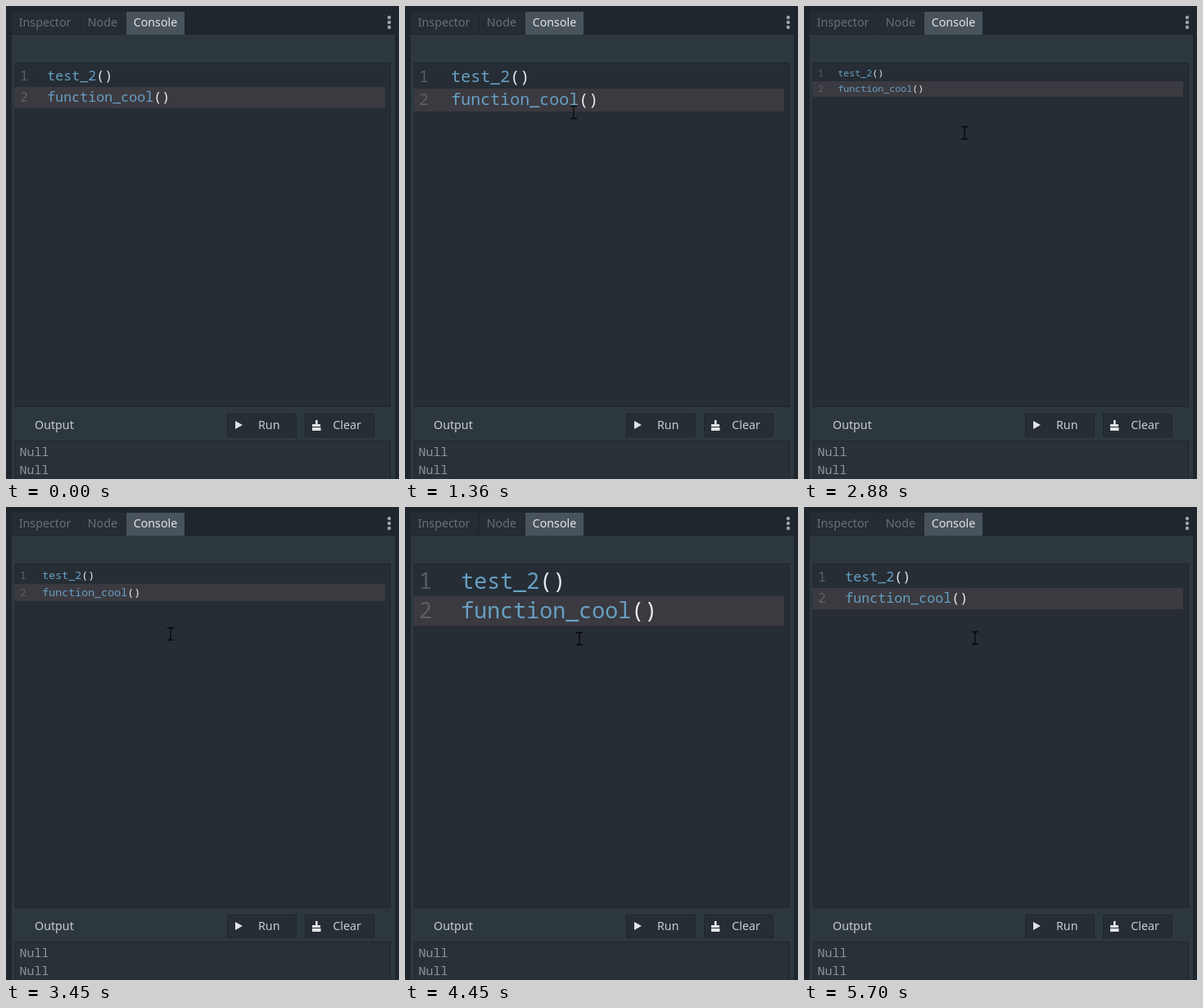
Animation of 480 by 578 pixels, one loop 6000 ms. Source, as an HTML page:

```html
<!DOCTYPE html>
<html lang="en">
<head>
<meta charset="utf-8">
<title>Console zoom</title>
<style>
  html, body { margin: 0; width: 100%; height: 100%; overflow: hidden; background: #20262e; }
  svg { display: block; }
  rect { shape-rendering: crispEdges; }
  text { font: 14.25px "Noto Sans", sans-serif; fill: #c9ced1; white-space: pre; }
  .dim { fill: #697077; }
  .mono { font: 15px "Noto Sans Mono", monospace; fill: #8d9498; }
  .code { font-family: "Noto Sans Mono", monospace; font-size: inherit; fill: #67a0c4; }
  .code tspan { fill: #e6eaec; }
  .num { fill: #596066; }
  .box { fill: #262d34; stroke: #1f262c; }
  .icon { fill: #e0e3e5; }
</style>
</head>
<body>
<svg width="480" height="578" viewBox="0 0 480 578">
  <rect width="480" height="578" fill="#20262e"/>
  <rect x="7" y="35" width="468" height="543" fill="#2d383e"/>
  <rect x="7" y="34" width="468" height="1" fill="#1e242a"/>
  <rect x="7" y="7" width="83" height="27" fill="#252c33"/>
  <rect x="91" y="7" width="55" height="27" fill="#252c33"/>
  <rect x="147" y="7" width="71" height="28" fill="#49535b"/>
  <text class="dim" x="15.7" y="25">Inspector</text>
  <text class="dim" x="99.7" y="25">Node</text>
  <text x="155.7" y="25" style="fill:#e0e4e6">Console</text>
  <g fill="#9ca1a5">
    <circle cx="468" cy="14" r="2.2"/><circle cx="468" cy="20" r="2.2"/><circle cx="468" cy="26" r="2.2"/>
  </g>

  <rect class="box" x="11.5" y="69.5" width="458" height="420"/>
  <rect id="line" x="11" width="452" fill="#3b3a40"/>
  <g id="code">
    <text class="code num" x="17">1</text>
    <text class="code">test_2<tspan>()</tspan></text>
    <text class="code num" x="17">2</text>
    <text class="code">function_cool<tspan>()</tspan></text>
  </g>

  <text x="35" y="517">Output</text>
  <rect class="box" x="270.5" y="498.5" width="84" height="28"/>
  <rect class="box" x="365.5" y="498.5" width="84" height="28"/>
  <path class="icon" d="M280 507L289 512L280 517Z"/>
  <text x="308" y="517">Run</text>
  <path class="icon" d="M378 506h2.6v5h3.4v3h-10v-3h4zM374 515h10.5v4h-10.5z"/>
  <text x="399.3" y="517">Clear</text>
  <rect class="box" x="11.5" y="531.5" width="458" height="60" style="fill:#293137"/>
  <text class="mono" x="16.5" y="550">Null</text>
  <text class="mono" x="16.5" y="572">Null</text>

  <path id="cursor" d="M-4 -7.5h3l1 1l1 -1h3M0 -6.5v13M-4 7.5h3l1 -1l1 1h3" fill="none" stroke="#06080a" stroke-width="1.3"/>
</svg>
<script>
const LOOP = 6000, TOP = 73;

// Turning points of the wheel: [ms, font size]
const ZOOM = [[1150, 17], [1980, 24], [2140, 24], [2990, 9], [3250, 9], [3880, 22],
  [4440, 26], [4505, 26], [5165, 12], [5435, 12], [5685, 17]];

// Pointer rests after its entry: [ms, x, y]
const POINTER = [[1150, 206, 128], [2180, 207, 138], [2880, 196, 155], [3270, 196, 155],
  [3850, 211, 155], [4450, 213, 161], [5180, 209, 160]];

const byId = id => document.getElementById(id);
const line = byId('line'), code = byId('code'), cursor = byId('cursor');
const rows = [...code.children];

// Linear interpolation between key points, held at both ends
function sample(keys, t) {
  const next = keys.findIndex(key => key[0] > t);
  const b = keys.at(next), a = next > 0 ? keys[next - 1] : b;
  const p = a === b ? 0 : (t - a[0]) / (b[0] - a[0]);
  return a.slice(1).map((v, i) => v + (b[i + 1] - v) * p);
}

const bezier = (a, b, c, d, p) => {
  const q = 1 - p;
  return a * q ** 3 + 3 * b * q * q * p + 3 * c * q * p * p + d * p ** 3;
};

function pointerAt(t) {
  if (t >= 1150) return sample(POINTER, t);
  const u = Math.max(0, (t - 550) / 600), p = u * u * (3 - 2 * u);
  return [bezier(35, -34, 90, 206, p), bezier(185, 60, -10, 128, p)];
}

function layoutCode(size) {
  const advance = Math.round(size * 0.617);
  const height = Math.round(size * 1.15 + 6.3);
  const baseline = TOP + Math.ceil(size * 0.928) + 2;
  code.style.fontSize = advance / 0.6 + 'px';
  rows.forEach((el, i) => {
    el.setAttribute('y', baseline + (i > 1 ? height : 0));
    if (i % 2) el.setAttribute('x', 20.3 + 3 * advance);
  });
  line.setAttribute('y', TOP + height);
  line.setAttribute('height', height);
}

function draw(now) {
  const t = now % LOOP;
  layoutCode(Math.round(sample(ZOOM, t)[0]));
  const [x, y] = pointerAt(t).map(Math.round);
  cursor.setAttribute('transform', `translate(${x} ${y})`);
  cursor.setAttribute('visibility', t < 390 ? 'hidden' : 'visible');
  requestAnimationFrame(draw);
}
draw(performance.now());
</script>
</body>
</html>
```
